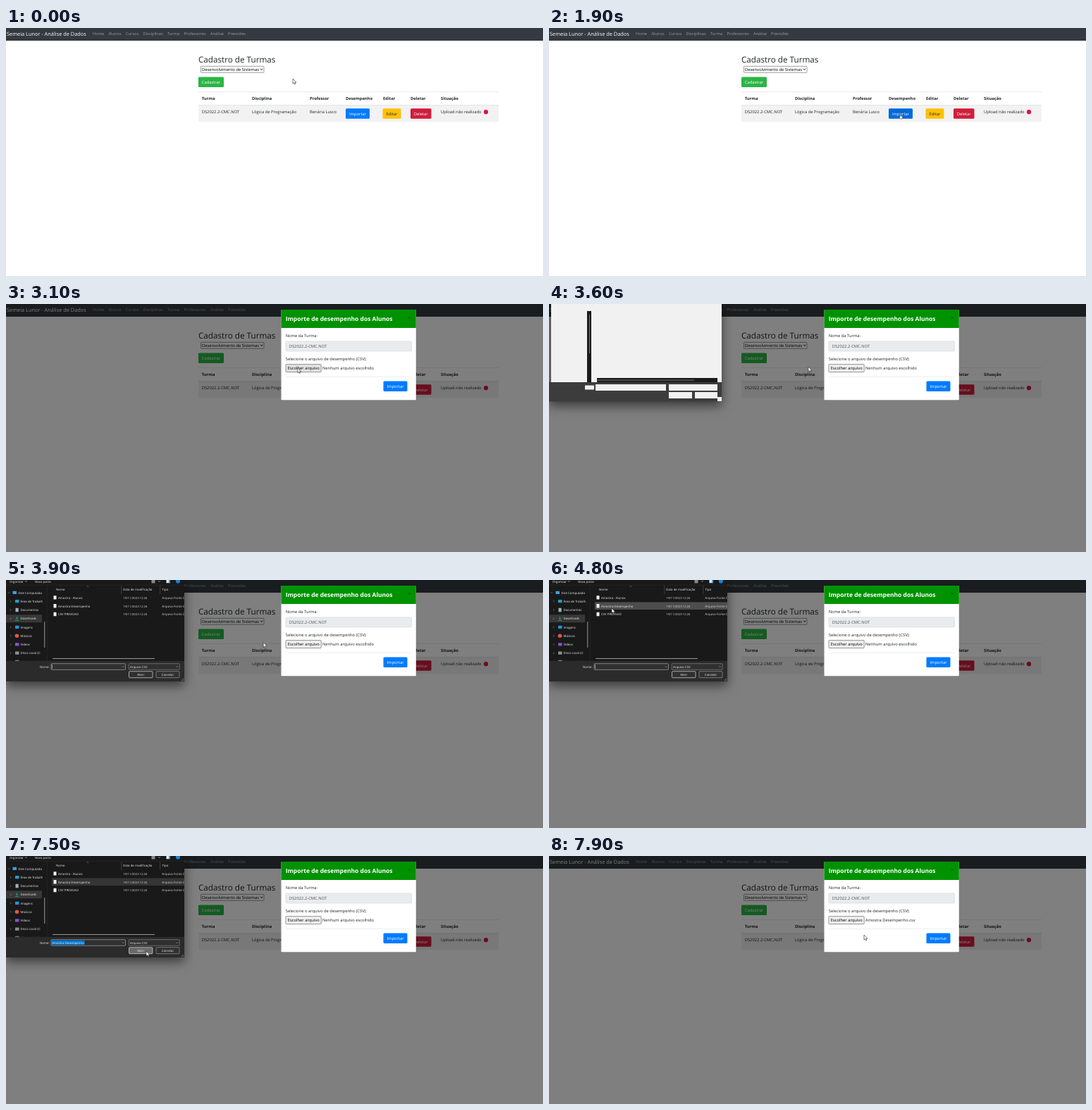
These frames come from a looping animation (762 by 352 pixels, 8000 ms). An HTML page:

```html
<!DOCTYPE html>
<html lang="pt-BR">
<head>
<meta charset="utf-8">
<title>Cadastro de Turmas</title>
<style>
  html, body { margin: 0; width: 100%; height: 100%; overflow: hidden; background: #fff; }
  svg { display: block; }
  #stage { width: 762px; height: 352px; }
  text { font-family: "Open Sans", "Noto Sans", sans-serif; text-rendering: geometricPrecision; white-space: pre; }
  #picker { filter: drop-shadow(0 6px 8px rgba(0, 0, 0, .55)); }
</style>
</head>
<body>
<svg id="stage" viewBox="0 0 762 352">
  <g id="page"></g>
  <g id="modal"></g>
  <g id="skeleton" style="filter:drop-shadow(0 6px 8px rgba(0,0,0,.55))"></g>
  <g id="picker"><svg id="pickerBody" width="253" height="144"></svg></g>
  <g id="cursor">
    <path id="arrow" d="M0 0V7L1.6 5.6 2.7 8 3.8 7.5 2.8 5.2H4.9Z" fill="#fff" stroke="#222" stroke-width=".6"/>
    <path id="hand" d="M0 .4Q.6-.3 1.1.4V2.8L3.6 3.4V5.2L2.9 7H.3L-1.5 4.4-.9 3.9 0 4.6Z" fill="#fff" stroke="#222" stroke-width=".5"/>
  </g>
</svg>
<script>
const $ = id => document.getElementById(id);
const INK = '#212529';

const rect = (x, y, w, h, fill, extra = '') =>
  `<rect x="${x}" y="${y}" width="${w}" height="${h}" fill="${fill}" ${extra}/>`;
const text = (x, y, str, size = 5.82, fill = INK, extra = '') =>
  `<text x="${x}" y="${y}" font-size="${size}" fill="${fill}" ${extra}>${str}</text>`;
const line = (d, color, width = .7) =>
  `<path d="${d}" fill="none" stroke="${color}" stroke-width="${width}"/>`;
const button = (x, y, w, label, fill, color = '#fff', id = '') =>
  rect(x, y, w, 14.5, fill, `rx="1.5" ${id && `id="${id}"`}`) +
  text(x + w / 2, y + 9.6, label, 5.82, color, 'text-anchor="middle"');

function buildPage() {
  const nav = [[123, 'Home'], [145.5, 'Alunos'], [170, 'Cursos'], [194.5, 'Disciplinas'],
    [229, 'Turma'], [252.5, 'Professores'], [290, 'Análise'], [315, 'Previsões']];
  const columns = [[277.7, 'Turma', 'DS2022.2-CMC.NOT'], [349, 'Disciplina', 'Lógica de Programação'],
    [431, 'Professor', 'Benária Lusco'], [482, 'Desempenho', ''], [535, 'Editar', ''],
    [574, 'Deletar', ''], [617, 'Situação', 'Upload não realizado']];
  return rect(0, 0, 762, 352, '#fff') + rect(0, 0, 762, 18, '#343a40') +
    text(1, 10.5, 'Semeia Lunor - Análise de Dados', 7.38, '#fff') +
    nav.map(([x, s]) => text(x, 9.8, s, 5.7, '#9a9da0')).join('') +
    text(273, 48.6, 'Cadastro de Turmas', 11.7) +
    rect(276.5, 54.3, 89.5, 9, '#fff', 'stroke="#767676" stroke-width=".7" rx=".8"') +
    text(278, 61.2, 'Desenvolvimento de Sistemas', 5.8, '#000') +
    line('M361 57.8l1.6 1.7 1.6-1.7', '#000', .9) +
    button(273, 69.5, 36, 'Cadastrar', '#2bb545') +
    rect(273, 110, 426, 23.3, '#f2f2f2') +
    line('M273 90.5H699', '#dee2e6') + line('M273 109.6H699', '#dee2e6', .9) +
    columns.map(([x, head, cell]) =>
      text(x, 102.2, head, 5.8, INK, 'font-weight="700"') + text(x, 121.3, cell)).join('') +
    button(482, 114.3, 34, 'Importar', '#007bff', '#fff', 'importRow') +
    button(534.5, 114.3, 26, 'Editar', '#ffc107', INK) +
    button(574, 114.3, 29.5, 'Deletar', '#d01c3c') +
    '<circle cx="681" cy="119.2" r="3.1" fill="#dc143c"/>';
}

function buildModal() {
  return rect(0, 0, 762, 352, '#000', 'opacity=".5"') +
    rect(390.5, 8, 191.3, 128.3, '#fff', 'rx="1"') + rect(390.5, 8, 191.3, 26, '#009200') +
    text(396.7, 24.2, 'Importe de desempenho dos Alunos', 8.48, '#fff', 'font-weight="700"') +
    text(570.5, 21.6, '×', 7, '#004900') +
    text(396.7, 47, 'Nome da Turma:') +
    rect(397, 53, 178.5, 14, '#e9ecef', 'stroke="#ced4da" stroke-width=".6" rx="1.5"') +
    text(401.7, 62.3, 'DS2022.2-CMC.NOT', 5.82, '#495057') +
    text(396.7, 80, 'Selecione o arquivo de desempenho (CSV):') +
    rect(397, 85.6, 50.2, 11, '#efefef', 'id="choose" stroke="#6b6b6b" stroke-width=".7" rx=".8"') +
    text(399.8, 93.3, 'Escolher arquivo', 5.8, '#000') +
    text(449, 93.3, '', 5.8, INK, 'id="chosen"') +
    line('M397 103.5H575.5', '#e3e6e9', .6) +
    button(535.5, 109.4, 34, 'Importar', '#007bff');
}

function buildSkeleton() {
  const blocks = [[51, 115.5, 13, 6], [66, 114, 100, 9], [170, 114, 69, 9],
    [170, 125, 33, 9], [207, 125, 32, 9], [239, 132, 6, 6]];
  return rect(0, 111, 245, 27.5, '#3c3c3c') + rect(3, 0, 242, 111, '#f1f1f1') +
    rect(54, 10, 6, 101, '#1b1b1b') + rect(57, 15, 1, 55, '#777') +
    rect(68, 105, 171, 6, '#1b1b1b') + rect(68, 107.6, 138, 1, '#777') +
    blocks.map(b => rect(...b, '#f1f1f1')).join('');
}

const FILES = ['Amostra - Alunos', 'Amostra Desempenho', 'CSV PREVISAO'];
const rowTop = i => 20 + i * 11.8;

function buildPicker() {
  const label = (x, y, s, extra) => text(x, y, s, 4.35, '#f0f0f0', extra);
  const places = [['Este Computado', '#3aa0dc'], ['Área de Trabalh', '#1f9fd0'], ['Documentos', '#9fb4c0'],
    ['Downloads', '#17a673'], ['Imagens', '#2b8fe0'], ['Músicas', '#e0574a'], ['Vídeos', '#8c4fd6'],
    ['Disco Local (C:', '#8a8f94'], ['Disco Local (D:', '#8a8f94']];
  const sidebar = places.map(([name, color], i) => {
    const y = 18 + i * 12.25, x = i ? 13 : 9.5;
    const icon = i == 5 ? `<circle cx="15.5" cy="${y}" r="2.8" fill="${color}"/>`
      : i == 3 ? line(`M15.5 ${y - 3}v4.2m-1.8-1.8l1.8 1.8 1.8-1.8M13 ${y + 2.8}h5`, color, .9)
      : i == 2 ? rect(x + .5, y - 2.8, 4.2, 5.6, color, 'rx=".4"')
      : rect(x, y - 2.3, 5.5, 4.3, color, 'rx=".6"');
    const chevron = i ? `M6 ${y - 1.4}l1.4 1.4-1.4 1.4` : `M2.5 ${y - .7}l1.4 1.4 1.4-1.4`;
    return line(chevron, '#aaa', .5) + icon + label(i ? 20.5 : 17.5, y + 1.6, name);
  }).join('');
  const files = FILES.map((name, i) => {
    const y = rowTop(i);
    return rect(65, y - .4, 188, 10.6, 'none', `id="row${i}"`) +
      rect(67.5, y + 2.2, 4, 5.4, '#f2f2f2', 'rx=".3"') + label(74, y + 6.7, name) +
      text(166.3, y + 6.7, '19/11/2023 12:26', 4.2, '#d8d8d8') +
      text(221.3, y + 6.7, 'Arquivo Fonte CSV', 4.35, '#d8d8d8');
  }).join('');
  const box = (x, y, w, h, fill, stroke, id) =>
    rect(x, y, w, h, fill, `id="${id}" stroke="${stroke}" stroke-width=".7" rx="1"`);
  return rect(0, 0, 253, 144, '#191919') +
    label(5, 3.7, 'Organizar') + label(41, 3.7, 'Nova pasta') +
    line('M27 1.2l1.4 1.4 1.4-1.4M216 1.2l1.4 1.4 1.4-1.4', '#ddd', .6) +
    rect(206.5, 0, 5, 4.5, '#888') + rect(227.5, 0, 5.5, 4.2, '#e6eef4') + rect(231, 0, 2, 4.2, '#3aa0dc') +
    '<circle cx="244" cy="1.7" r="3" fill="#1683d8"/>' + line('M0 7.2H253', '#303030', .5) +
    rect(0, 49.3, 51, 11, '#383838', 'rx="1"') + sidebar +
    rect(54.3, 59, 1, 37, '#9a9a9a', 'rx=".5"') + line('M58.5 8V115', '#2a2a2a', .5) +
    label(71, 14.6, 'Nome') + label(166, 14.6, 'Data de modificação') + label(221.5, 14.6, 'Tipo') +
    line('M114.5 9.8l1.4-1.3 1.4 1.3', '#aaa', .5) + line('M163.7 8V20M218.7 8V20', '#555', .6) + files +
    rect(66, 111, 145, 1, '#9a9a9a', 'rx=".5"') +
    rect(0, 114.8, 253, 30, '#2b2b2b') + label(48, 124.6, 'Nome:') +
    box(64, 118.7, 105.5, 8.6, '#303030', '#a5a5a5', 'nameField') +
    rect(65, 119.7, 46.5, 6.4, '#0078d4', 'id="selection"') +
    label(65.3, 124.6, FILES[1], 'id="fileName"') +
    rect(65.3, 120, .5, 6, '#fff', 'id="caret"') +
    box(174.2, 118.7, 72, 8.6, '#303030', '#858585', 'fileType') + label(176, 124.6, 'Arquivo CSV') +
    line('M164.8 122.4l1.4 1.4 1.4-1.4M241.3 122.4l1.4 1.4 1.4-1.4', '#bbb', .5) +
    box(174.5, 129.7, 33.5, 9, '#303030', '#ddd', 'open') +
    box(213, 129.7, 33, 9, '#303030', '#999', 'cancel') +
    label(191.2, 135.8, 'Abrir', 'text-anchor="middle"') +
    label(229.5, 135.8, 'Cancelar', 'text-anchor="middle"') +
    line('M249 143l3-3M251 143l1-1', '#bbb', .6);
}

$('page').innerHTML = buildPage();
$('modal').innerHTML = buildModal();
$('skeleton').innerHTML = buildSkeleton();
$('pickerBody').innerHTML = buildPicker();

// Pointer stops: time, x, y
const STOPS = [[400, 407, 72], [1000, 484, 153], [1300, 495, 127], [1600, 498, 122], [2100, 498, 122],
  [2800, 424, 91], [2950, 424, 91], [3500, 368, 89], [3850, 368, 89], [4700, 89, 40],
  [6350, 89, 40], [7200, 199, 135], [7550, 199, 135], [7900, 447, 112]];

function pointerAt(t) {
  const next = STOPS.findIndex(s => s[0] > t);
  if (next === 0) return STOPS[0].slice(1);
  if (next < 0) return STOPS[STOPS.length - 1].slice(1);
  const [t0, x0, y0] = STOPS[next - 1], [t1, x1, y1] = STOPS[next];
  const u = (t - t0) / (t1 - t0), k = u * u * (3 - 2 * u);
  return [x0 + (x1 - x0) * k, y0 + (y1 - y0) * k];
}

const show = (id, on) => $(id).style.display = on ? '' : 'none';
const fill = (id, color) => $(id).setAttribute('fill', color);

function draw(t) {
  const [x, y] = pointerAt(t);
  const over = (left, top, w, h) => x >= left && x <= left + w && y >= top && y <= top + h;
  const modalOpen = t >= 2000, picking = t >= 3700 && t < 7700, picked = t >= 5300;
  const onImport = !modalOpen && over(482, 114.3, 34, 14.5);

  show('modal', modalOpen);
  show('skeleton', t >= 3600 && t < 3700);
  show('picker', picking);
  $('picker').style.opacity = t >= 7600 ? .5 : 1;

  fill('importRow', onImport ? '#0069d9' : '#007bff');
  fill('choose', over(397, 85.6, 50, 11) ? '#e2e2e2' : '#efefef');
  $('chosen').textContent = t >= 7700 ? 'Amostra Desempenho.csv' : 'Nenhum arquivo escolhido';

  FILES.forEach((_, i) => {
    const hover = over(65, rowTop(i) - .4, 188, 11.2);
    fill('row' + i, hover ? '#4d4d4d' : picked && i == 1 ? '#353535' : 'none');
  });
  show('selection', picked);
  show('fileName', picked);
  show('caret', !picked);
  fill('open', over(174.5, 129.7, 33.5, 9) ? '#6a6a6a' : '#303030');

  $('cursor').setAttribute('transform', `translate(${x} ${y})`);
  show('hand', onImport);
  show('arrow', !onImport);
}

function tick() {
  draw(Math.floor(performance.now() % 8000 / 100) * 100);
  requestAnimationFrame(tick);
}
tick();
</script>
</body>
</html>
```
